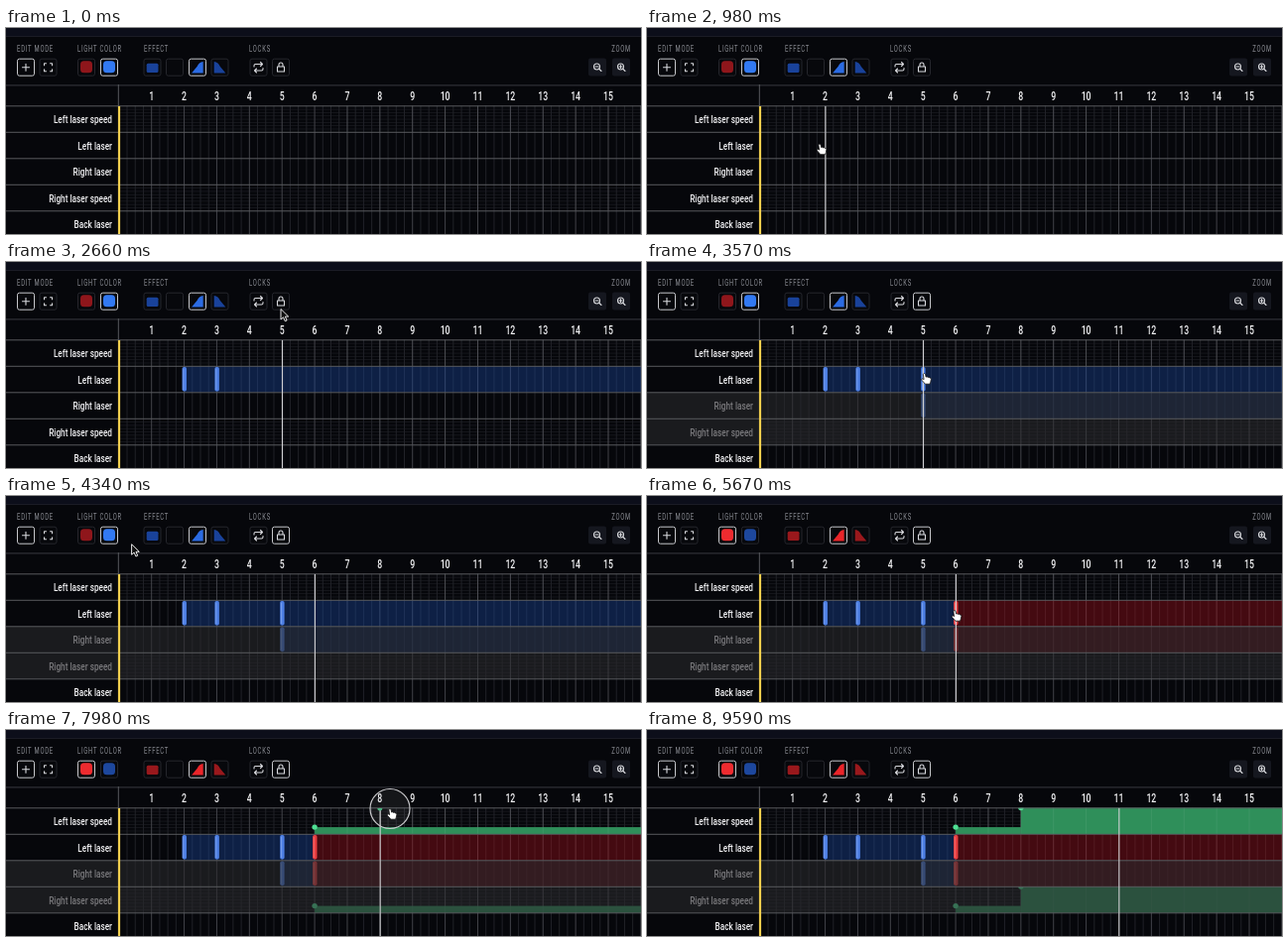
An HTML page for the animation above (9660 ms loop, 640 px wide and 208 px high).

```html
<!DOCTYPE html>
<html lang="en">
<head>
<meta charset="utf-8">
<title>Light event editor</title>
<style>
html, body { margin: 0; width: 100%; height: 100%; overflow: hidden; background: #06070b; }
svg { display: block; width: 640px; height: 208px; }
text { font-family: Roboto, "Liberation Sans", sans-serif; fill: #f2f2f4; }
.cap { font-size: 8.3px; letter-spacing: 1.1px; fill: #8b8d94; }
.beat { font-size: 12.3px; font-weight: 500; text-anchor: middle; }
.row { font-size: 11.6px; font-weight: 500; text-anchor: end; }
.icon { fill: none; stroke: #d8d9dd; stroke-width: 1.1; stroke-linecap: round; stroke-linejoin: round; }
</style>
</head>
<body>
<svg id="stage" viewBox="0 0 640 208"></svg>
<script>
const LOOP = 9660, STEP = 70;
const GRID_X = 113.8, BEAT = 32.88, TOP = 78.5, ROW = 26.5;
const CONDENSED = .71; // one narrow style for all type
const stage = document.getElementById('stage');
const beatX = b => GRID_X + b * BEAT;
const rowY = r => TOP + r * ROW;

function add(tag, attrs, parent = stage) {
  const el = document.createElementNS('http://www.w3.org/2000/svg', tag);
  for (const k in attrs) el.setAttribute(k, attrs[k]);
  parent.appendChild(el);
  return el;
}
const rect = (x, y, width, height, fill, more, parent) => add('rect', { x, y, width, height, fill, ...more }, parent);
const path = (d, more, parent) => add('path', { d, ...more }, parent);
const label = (str, x, y, cls, more) => {
  const el = add('text', { transform: `translate(${x} ${y}) scale(${CONDENSED} 1)`, class: cls, ...more });
  el.textContent = str;
  return el;
};
const show = (el, on) => el.setAttribute('visibility', on ? 'visible' : 'hidden');

// Toolbar
rect(0, 0, 640, 208, '#06070b');
rect(0, 0, 640, 8, '#0c0e1a');
rect(0, 8, 640, 1, '#1b1c25');
[['EDIT MODE', 11], ['LIGHT COLOR', 72], ['EFFECT', 139], ['LOCKS', 245]]
  .forEach(([s, x]) => label(s, x, 24.2, 'cap'));
label('ZOOM', 630, 24.2, 'cap', { 'text-anchor': 'end' });

function button(cx, on) {
  return rect(cx - 8.5, 31.2, 17, 17, '#07080c',
    { rx: 2, stroke: on ? '#c6c7cb' : '#25262c', 'stroke-width': 1 });
}
const press = (b, on) => b.setAttribute('stroke', on ? '#c6c7cb' : '#25262c');

button(20, true);
path('M16.5 39.7h7M20 36.2v7', { class: 'icon' });
button(42.5, false);
path('M38.5 37.7v-2h2M44.5 35.7h2v2M46.5 41.7v2h-2M40.5 43.7h-2v-2', { class: 'icon' });
const redBtn = button(81, false), blueBtn = button(104, true);
const swatch = cx => rect(cx - 6, 33.3, 12, 12, '#000', { rx: 3.6 });
const redSwatch = swatch(81), blueSwatch = swatch(104);
[147.5, 170, 193, 215.5].forEach(x => button(x, x === 193));
const dimFx = [
  rect(141.7, 35.7, 11.8, 9.3, '#000', { rx: 1.5 }),
  path('M209.7 34v11.4h11.6l-5.6-6.600q-1.500-4.200-6-4.800z')
];
const mainFx = path('M198.700 34v11.400h-11.600l5.600-6.600q1.500-4.200 6-4.800z');
button(254.5, false);
path('M250 39v-1q0-1.5 1.5-1.5h7l-2-2M258.500 36.500l-2 2M259 40.500v1q0 1.500-1.500 1.500h-7l2-2M250.500 43l2 2', { class: 'icon', 'stroke-width': 1 });
const lockBtn = button(277, false);
path('M273.500 39h7v5h-7zM275 39v-2a2 2 0 0 1 4 0v2', { class: 'icon' });
[596, 620].forEach((x, i) => {
  rect(x - 9, 30.5, 18, 18, '#15171f', { rx: 2 });
  add('circle', { cx: x - .5, cy: 39, r: 3, class: 'icon' });
  path(`M${x + 2} 41.500l2 2M${x - 2} 39h3` + (i ? `M${x - .5} 37.500v3` : ''), { class: 'icon', 'stroke-width': .9 });
});

// Beat header and grid
rect(0, 57.4, 640, 1, '#38393f');
rect(112.8, 57, 1, 22, '#58595e');
for (let b = 1; b < 16; b++) label(b, beatX(b), 72.5, 'beat');
for (const r of [0, 3])
  for (let i = 1; i < 8; i++) rect(114, rowY(r) + i * ROW / 8, 526, .6, '#1e1f25');
for (let i = 1; i < 65; i++)
  rect(beatX(i / 4) - .5, TOP, 1, 130, i % 4 ? '#212228' : '#424349');

// Events
const tints = { blue: ['#1a469c', '#4d7fe4', '#8fb0f4'], red: ['#a0101a', '#e63c40', '#ff8a86'] };
const lights = [
  { row: 1, beat: 2, tint: 'blue', at: 1190 },
  { row: 1, beat: 3, tint: 'blue', at: 1610 },
  { row: 1, beat: 5, tint: 'blue', at: 3430 },
  { row: 2, beat: 5, tint: 'blue', at: 3430 },
  { row: 1, beat: 6, tint: 'red', at: 5670 },
  { row: 2, beat: 6, tint: 'red', at: 5670 }
];
for (const e of lights) {
  const [fill] = tints[e.tint];
  e.tail = rect(beatX(e.beat), rowY(e.row), 10, ROW, fill, { opacity: .4 });
}
for (const e of lights) {
  const x = beatX(e.beat), y = rowY(e.row) + 1, [, body, edge] = tints[e.tint];
  e.mark = add('g', {});
  rect(x - 2, y, 4.4, ROW - 2, body, { rx: 1.7 }, e.mark);
  rect(x - 1.2, y + 1.5, 1, ROW - 5, edge, { rx: .5, opacity: .6 }, e.mark);
}

const speeds = [];
for (const row of [0, 3])
  for (const [beat, level, at] of [[6, .26, 6510], [8, 1, 8050]]) {
    const x = beatX(beat), h = ROW * level, y = rowY(row + 1) - h;
    const bar = rect(x, y, 10, h, '#2f8f5a');
    const g = add('g', {});
    const from = Math.max(y, rowY(row));
    path(`M${x - 2.7} ${from}a2.700 2.700 0 0 0 5.400 0` + (level < 1 ? 'a2.700 2.700 0 0 0-5.400 0' : ''), { fill: '#4fe094' }, g);
    speeds.push({ row, beat, at, bar, mark: g });
  }
// Beat lines stay faintly visible on the green bars
for (let b = 7; b < 17; b++)
  for (const r of [0, 3]) rect(beatX(b) - .5, rowY(r), 1, ROW, '#ffffff', { opacity: .07 });

rect(0, 184, 113, 24, '#06070b');
['Left laser speed', 'Left laser', 'Right laser', 'Right laser speed', 'Back laser']
  .forEach((s, r) => label(s, 107, rowY(r) + 17.7, 'row'));
const mute = rect(0, rowY(2), 640, 2 * ROW, '#28292c', { opacity: .6 });
for (let r = 0; r < 5; r++) rect(0, rowY(r) - .2, 640, 1, '#58595d');
rect(112.9, 79, 2.2, 129, '#f2cf4e');

// Pointer
const hoverLine = rect(0, 79, 1.1, 129, '#cfcfd2');
const hoverDot = path('M-2.500 79a2.500 2.500 0 0 0 5 0z', { fill: '#3fae76' });
const ring = add('circle', { r: 20, fill: '#ffffff', 'fill-opacity': .06, stroke: '#c9c9cc', 'stroke-width': 1.2 });
const hand = path('M-1.200 0.800Q0-.800 1.100.800L1.600 3.600Q2.800 2.800 3.600 3.900Q4.800 3.300 5.400 4.400Q6.900 4.200 6.900 5.700L6.300 8.700L5.600 10.700H.900L-2.600 6.800Q-3.200 5.400-1.800 5.300L-.400 6.100Z',
  { fill: '#fff', stroke: '#111', 'stroke-width': .8 });
const arrow = path('M0 0V10.500L2.500 8.300L4.300 12.300L6.100 11.500L4.400 7.600H7.700Z',
  { fill: '#111', stroke: '#fff', 'stroke-width': .9 });

const route = [
  [0, 140, 222], [700, 181, 122], [980, 174, 117], [1190, 178, 117], [1470, 212, 117],
  [1680, 212, 117], [2310, 276, 96], [2660, 277, 47.5], [2800, 277, 41], [3010, 277, 41],
  [3360, 279, 112], [3570, 279.5, 112.5], [3850, 311, 106], [3990, 311, 84], [4480, 81, 40],
  [4900, 81, 40], [5390, 310, 115.500], [5740, 310, 115.500], [6370, 312, 97], [6650, 312, 97],
  [7700, 383, 81], [7980, 387, 79.5], [8190, 385, 80], [8400, 385, 80], [9170, 476, 150], [9520, 478, 212], [9660, 478, 222]
];
const beats = [[210, 1], [630, 2], [1330, 3], [1960, 4], [2240, 5], [3710, 6], [7000, 7], [7560, 8], [8610, 9], [8820, 10], [9030, 11]];
const clicks = [6440, 7980];

const ease = p => p * p * (3 - 2 * p);
function pointerAt(t) {
  const i = route.findIndex(k => k[0] > t);
  const [t0, x0, y0] = route[i - 1], [t1, x1, y1] = route[i];
  const p = ease((t - t0) / (t1 - t0));
  return [x0 + (x1 - x0) * p, y0 + (y1 - y0) * p];
}

function drawSpans(list, t, shape) {
  for (const e of list) {
    const on = t >= e.at;
    const next = list.find(n => n.row === e.row && n.beat > e.beat && t >= n.at);
    e[shape].setAttribute('width', (next ? beatX(next.beat) : 640) - beatX(e.beat));
    show(e[shape], on);
    show(e.mark, on);
  }
}

function render(t) {
  const isRed = t >= 4690, locked = t >= 2870;
  const [x, y] = pointerAt(t);
  press(redBtn, isRed);
  press(blueBtn, !isRed);
  press(lockBtn, locked);
  redSwatch.setAttribute('fill', isRed ? '#ee2b2f' : '#8f161b');
  blueSwatch.setAttribute('fill', isRed ? '#1d479d' : '#3279f2');
  dimFx.forEach(el => el.setAttribute('fill', isRed ? '#99181c' : '#19429a'));
  mainFx.setAttribute('fill', isRed ? '#ea2529' : '#2b6be2');
  show(mute, locked);

  drawSpans(lights, t, 'tail');
  drawSpans(speeds, t, 'bar');

  const beat = beats.filter(b => b[0] <= t).pop();
  show(hoverLine, beat);
  if (beat) hoverLine.setAttribute('x', beatX(beat[1]) - .2);
  show(hoverDot, t >= 7560 && t < 8050);
  hoverDot.setAttribute('transform', `translate(${beatX(8)} 0)`);

  const inGrid = y >= 78, onButton = y < 46;
  for (const [el, on] of [[hand, inGrid || onButton], [arrow, !inGrid && !onButton]]) {
    el.setAttribute('transform', `translate(${x} ${y})`);
    show(el, on);
  }
  show(ring, clicks.some(c => t >= c - 70 && t < c + 140));
  ring.setAttribute('cx', x);
  ring.setAttribute('cy', y);
}

const start = performance.now();
function tick() {
  const t = (performance.now() - start) % LOOP;
  render(Math.floor(t / STEP) * STEP);
  requestAnimationFrame(tick);
}
tick();
</script>
</body>
</html>
```
